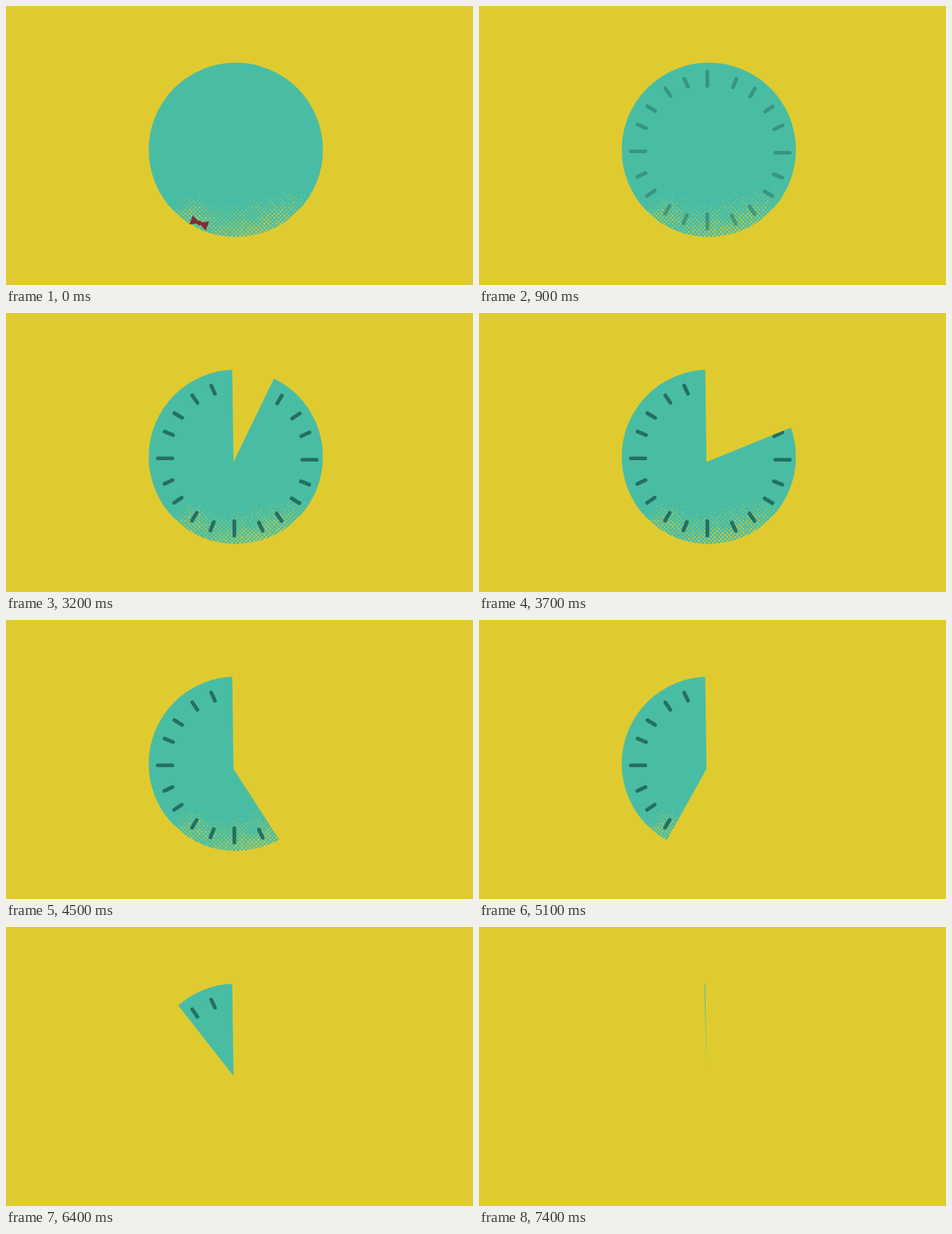
These frames come from a looping animation (670 by 400 pixels, 7500 ms). An HTML page with a canvas:

```html
<!DOCTYPE html>
<html lang="en">
<head>
<meta charset="utf-8">
<title>Clock wipe</title>
<style>
  html, body { margin: 0; width: 100%; height: 100%; overflow: hidden; background: #dfcb30; }
  canvas { display: block; }
</style>
</head>
<body>
<canvas id="stage" width="670" height="400"></canvas>
<script>
const ctx = document.getElementById('stage').getContext('2d');
const LOOP = 7500, STEP = 100;
const YELLOW = '#dfcb30', TEAL = '#49bda4', DARK = '#25705f', RED = '#842b38';
const disc = { x: 329.7, y: 206.2, r: 125 };
const dial = { x: 331.3, y: 208.1, r: 104 };
const pivot = { x: 326.4, y: 213.5 };
const wipe = { start: 2800, end: 7400, from: -0.8, to: 358.7, rest: 359.2 };

const rad = deg => (deg - 90) * Math.PI / 180;
const progress = (t, a, b) => Math.min(1, Math.max(0, (t - a) / (b - a)));
const bump = (x, y, cx, cy, w, h) => Math.exp(-(((x - cx) / w) ** 2) - ((y - cy) / h) ** 2);
// Picks up speed until past the middle, then settles softly
const sweep = p => p + 1.2 * p * (1 - p) * (p - 0.22);

function hash(i, j) {
  const v = Math.sin(i * 127.1 + j * 311.7) * 43758.5453;
  return v - Math.floor(v);
}

function circle(x, y, r) {
  ctx.moveTo(x + r, y);
  ctx.arc(x, y, r, 0, Math.PI * 2);
}

function line(x1, y1, x2, y2) {
  ctx.moveTo(x1, y1);
  ctx.lineTo(x2, y2);
}

// Halftone dots grow towards the bottom, with a few denser and barer patches
function dotSize(x, y, rnd) {
  const top = 272 + 14 * bump(x, 0, 315, 0, 28, 1) - 8 * bump(x, 0, 425, 0, 40, 1);
  const patch = 0.35 * bump(x, y, 268, 292, 18, 12)
    - 0.5 * bump(x, y, 355, 304, 9, 7)
    - 0.6 * bump(x, y, 284, 322, 16, 8)
    - 0.7 * bump(x, y, 225, 280, 22, 25);
  const r = 0.35 + (y - top) / 45 + patch + (rnd - 0.5) * 0.5;
  return r < 0.45 ? 0 : Math.min(r, 1.5);
}

const dots = [];
for (let j = 0; j < 25; j++) {
  for (let i = 0; i < 42; i++) {
    const x = 214 + i * 5.8 + (j % 2) * 2.9, y = 260 + j * 2.9;
    const r = dotSize(x, y, hash(i, j));
    if (r && Math.hypot(x - disc.x, y - disc.y) < disc.r + 1) dots.push([x, y, r]);
  }
}

function drawDisc() {
  ctx.fillStyle = TEAL;
  ctx.beginPath();
  circle(disc.x, disc.y, disc.r);
  ctx.fill();
  ctx.fillStyle = YELLOW;
  ctx.beginPath();
  for (const d of dots) circle(...d);
  ctx.fill();
}

function drawBow(alpha) {
  ctx.save();
  ctx.globalAlpha = alpha;
  ctx.fillStyle = RED;
  ctx.translate(277.3, 311);
  ctx.rotate(0.35);
  for (const side of [-1, 1]) {
    ctx.beginPath();
    ctx.moveTo(-side, 0);
    ctx.lineTo(side * 12.5, -7);
    ctx.lineTo(side * 12.5, 7);
    ctx.fill();
  }
  ctx.beginPath();
  circle(0, 0, 3.4);
  ctx.fill();
  ctx.restore();
}

function drawTicks(alpha) {
  ctx.save();
  ctx.globalAlpha = alpha;
  ctx.strokeStyle = DARK;
  ctx.lineWidth = 5.4;
  ctx.lineCap = 'round';
  ctx.beginPath();
  // Short marks: position angle and tilt, the same in each quarter
  const marks = [[20, 22], [36, 31], [54.5, 56], [70.8, 65]];
  for (let turn = 0; turn < 360; turn += 90) {
    for (const [at, tilt] of marks) {
      const x = dial.x + dial.r * Math.cos(rad(at + turn));
      const y = dial.y + dial.r * Math.sin(rad(at + turn));
      const dx = 6.5 * Math.cos(rad(tilt + turn)), dy = 6.5 * Math.sin(rad(tilt + turn));
      line(x - dx, y - dy, x + dx, y + dy);
    }
  }
  // Long marks
  for (const s of [-1, 1]) {
    line(327.6, 206.5 + s * 92, 327.6, 206.5 + s * 112.5);
    line(331.8 + s * 93.3, 209.4 + s, 331.8 + s * 114, 209.4 + s);
  }
  ctx.stroke();
  ctx.restore();
}

function clipWedge(from) {
  ctx.beginPath();
  ctx.moveTo(pivot.x, pivot.y);
  ctx.arc(pivot.x, pivot.y, 200, rad(from), rad(wipe.rest));
  ctx.closePath();
  ctx.clip();
}

function draw(t) {
  const p = progress(t, wipe.start, wipe.end);
  ctx.fillStyle = YELLOW;
  ctx.fillRect(0, 0, 670, 400);
  ctx.save();
  if (p > 0) clipWedge(wipe.from + (wipe.to - wipe.from) * sweep(p));
  drawDisc();
  drawBow(1 - progress(t, 200, 500));
  drawTicks(progress(t, 800, 1000));
  ctx.restore();
}

const start = performance.now();
let shown = -1;
function tick() {
  const t = (performance.now() - start) % LOOP;
  const step = Math.floor(t / STEP) * STEP;
  if (step !== shown) draw(shown = step);
  requestAnimationFrame(tick);
}
tick();
</script>
</body>
</html>
```
